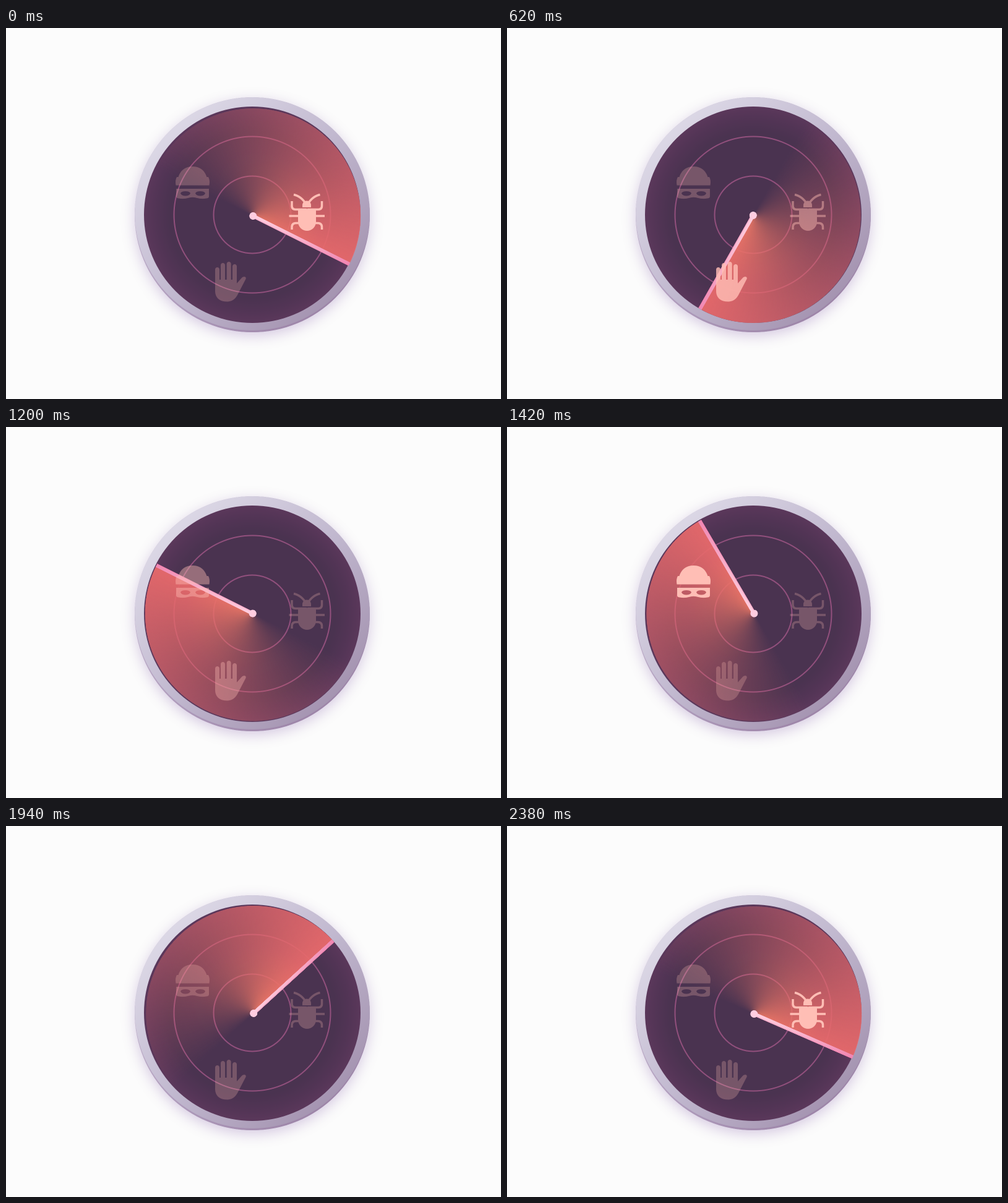
An HTML page with a canvas that plays this animation: 800 px wide and 600 px high, repeating every 2400 ms.

```html
<!DOCTYPE html>
<html lang="en">
<head>
<meta charset="utf-8">
<title>Threat radar</title>
<style>
  html, body { margin: 0; width: 100%; height: 100%; overflow: hidden; background: #fcfcfc; }
  canvas { display: block; }
</style>
</head>
<body>
<canvas id="stage" width="800" height="600"></canvas>
<script>
const LOOP = 2400, STEP = 20, TAU = Math.PI * 2;
const CX = 398, CY = 302;
const REACH = 174;
const DIM = 0.25;
const ICON_COLOR = '#ffbeb5';
const ctx = document.getElementById('stage').getContext('2d');

// Renders once into an offscreen layer, at double density for clean rotation.
function layer(width, height, paint) {
  const canvas = document.createElement('canvas');
  canvas.width = width * 2;
  canvas.height = height * 2;
  const c = canvas.getContext('2d');
  c.scale(2, 2);
  paint(c);
  return canvas;
}

function disc(c, x, y, r, fill) {
  c.beginPath();
  c.arc(x, y, r, 0, TAU);
  c.fillStyle = fill;
  c.fill();
}

function gradient(g, ...stops) {
  stops.forEach(([at, color]) => g.addColorStop(at, color));
  return g;
}

const dial = layer(800, 600, c => {
  c.fillStyle = '#fcfcfc';
  c.fillRect(0, 0, 800, 600);

  c.save();
  c.shadowColor = 'rgba(125, 85, 165, 0.3)';
  c.shadowBlur = 44;
  c.shadowOffsetY = 12;
  disc(c, CX, CY, 190, '#b0a0bc');
  c.restore();

  c.save();
  c.beginPath();
  c.arc(CX, CY, 190, 0, TAU);
  c.clip();
  const rim = gradient(c.createLinearGradient(CX - 134, CY - 134, CX + 134, CY + 134),
    [0, '#dcd8e6'], [0.5, '#c2b9d0'], [1, '#a594b1']);
  disc(c, CX, CY, 191, rim);
  c.beginPath();
  c.rect(0, 0, 800, 600);
  c.arc(CX, CY - 3, 190, 0, TAU, true);
  c.fillStyle = 'rgba(140, 100, 150, 0.32)';
  c.fill();
  c.restore();

  disc(c, CX, CY, 175, gradient(c.createRadialGradient(CX, CY, 0, CX, CY, 175),
    [0, '#4a3350'], [0.76, '#4a3350'], [0.9, '#533556'], [1, '#5b385b']));

  c.strokeStyle = '#92507d';
  c.lineWidth = 2;
  for (const r of [62.5, 126.5]) {
    c.beginPath();
    c.arc(CX, CY, r, 0, TAU);
    c.stroke();
  }
});

// The beam points along +x; its fading trail covers the half turn behind it.
const sweep = layer(400, 400, c => {
  c.translate(200, 200);
  c.beginPath();
  c.moveTo(0, 0);
  c.arc(0, 0, REACH, Math.PI, TAU);
  c.closePath();
  c.fillStyle = gradient(c.createConicGradient(0, 0, 0),
    [0, 'rgba(230, 105, 107, 0)'], [0.5, 'rgba(230, 105, 107, 0)'], [1, 'rgba(230, 105, 107, 0.97)']);
  c.fill();
  c.globalCompositeOperation = 'source-atop';
  disc(c, 0, 0, REACH, gradient(c.createRadialGradient(0, 0, 0, 0, 0, 110),
    [0, 'rgba(240, 130, 96, 0.6)'], [1, 'rgba(240, 130, 96, 0)']));
  c.globalCompositeOperation = 'source-over';

  c.fillStyle = gradient(c.createLinearGradient(0, 0, REACH, 0),
    [0, '#ffcfe0'], [0.45, '#f9b5ce'], [1, '#f087b2']);
  c.fillRect(0, -3, REACH, 6);
  c.fillStyle = 'rgba(235, 110, 165, 0.3)';
  c.fillRect(0, 1.5, REACH, 1.5);
  disc(c, 0, 0, 6, '#ffcde0');
});

function paintBug(c) {
  c.lineWidth = 3.5;
  c.fill(new Path2D('M472 293H501V313.5A14.5 14.5 0 0 1 472 313.5Z'));
  c.fill(new Path2D('M479 290V286Q480 279.5 486 279.5T493 286V290Z'));
  const limbs = new Path2D('M483 282Q476 272 465 269.5' +
    'M486 293.5H468Q462 293.5 462 287.5V280' +
    'M473 304H457.5' +
    'M473 315.5H469Q462 315.5 462 322V326');
  c.stroke(limbs);
  c.translate(972.5, 0);
  c.scale(-1, 1);
  c.stroke(limbs);
}

function paintHand(c) {
  for (const [x, top] of [[338, 387], [347, 380], [356.7, 378], [366, 382]]) {
    c.beginPath();
    c.roundRect(x, top, 7, 40, 3.5);
    c.fill();
  }
  c.fill(new Path2D('M338 407V425C338 437 346 442.5 357 442.5C366 442.5 371 438 375 430' +
    'L387.5 406C389 402 384 401 381 404L373 413V407Z'));
}

function paintThief(c) {
  c.fill(new Path2D('M274.5 254.5Q273 246 276 241H278.5C282 230 290 224 301.5 224' +
    'S321 230 324.5 241H327Q330 246 328.5 254.5Z'));
  c.fill(new Path2D('M275 260H328V272Q328 275.5 324 275.5Q316 277 309 275' +
    'Q301.5 272.5 294 275Q287 277 279 275.5Q275 275.5 275 272Z' +
    'M282 267.5Q283 264 290 264T298 267.5Q296 271.5 290 271.5T282 267.5Z' +
    'M306 267.5Q307 264 314 264T322 267.5Q320 271.5 314 271.5T306 267.5Z'), 'evenodd');
}

// Each icon lights up at `start`, then holds and fades (durations in ms).
const icons = [
  { paint: paintBug, start: 2180, rise: 190, hold: 180, fade: 650 },
  { paint: paintHand, start: 500, rise: 160, hold: 60, fade: 560 },
  { paint: paintThief, start: 1150, rise: 220, hold: 50, fade: 500 }
];
for (const icon of icons) {
  icon.image = layer(800, 600, c => {
    c.fillStyle = c.strokeStyle = ICON_COLOR;
    icon.paint(c);
  });
}

function opacity({ start, rise, hold, fade }, time) {
  const age = (time - start + LOOP) % LOOP;
  const level = Math.min(age / rise, 1 - (age - rise - hold) / fade, 1);
  return DIM + (1 - DIM) * Math.max(0, level);
}

function draw(time) {
  ctx.drawImage(dial, 0, 0, 800, 600);

  ctx.save();
  ctx.translate(399, 302.8);
  ctx.rotate(26.6 * Math.PI / 180 + time / LOOP * TAU);
  ctx.translate(0.8, 0.95);
  ctx.drawImage(sweep, -200, -200, 400, 400);
  ctx.restore();

  for (const icon of icons) {
    ctx.globalAlpha = opacity(icon, time);
    ctx.drawImage(icon.image, 0, 0, 800, 600);
  }
  ctx.globalAlpha = 1;
}

const begin = performance.now();
function tick() {
  const elapsed = performance.now() - begin;
  draw(Math.floor(elapsed / STEP) * STEP % LOOP);
  requestAnimationFrame(tick);
}
tick();
</script>
</body>
</html>
```
